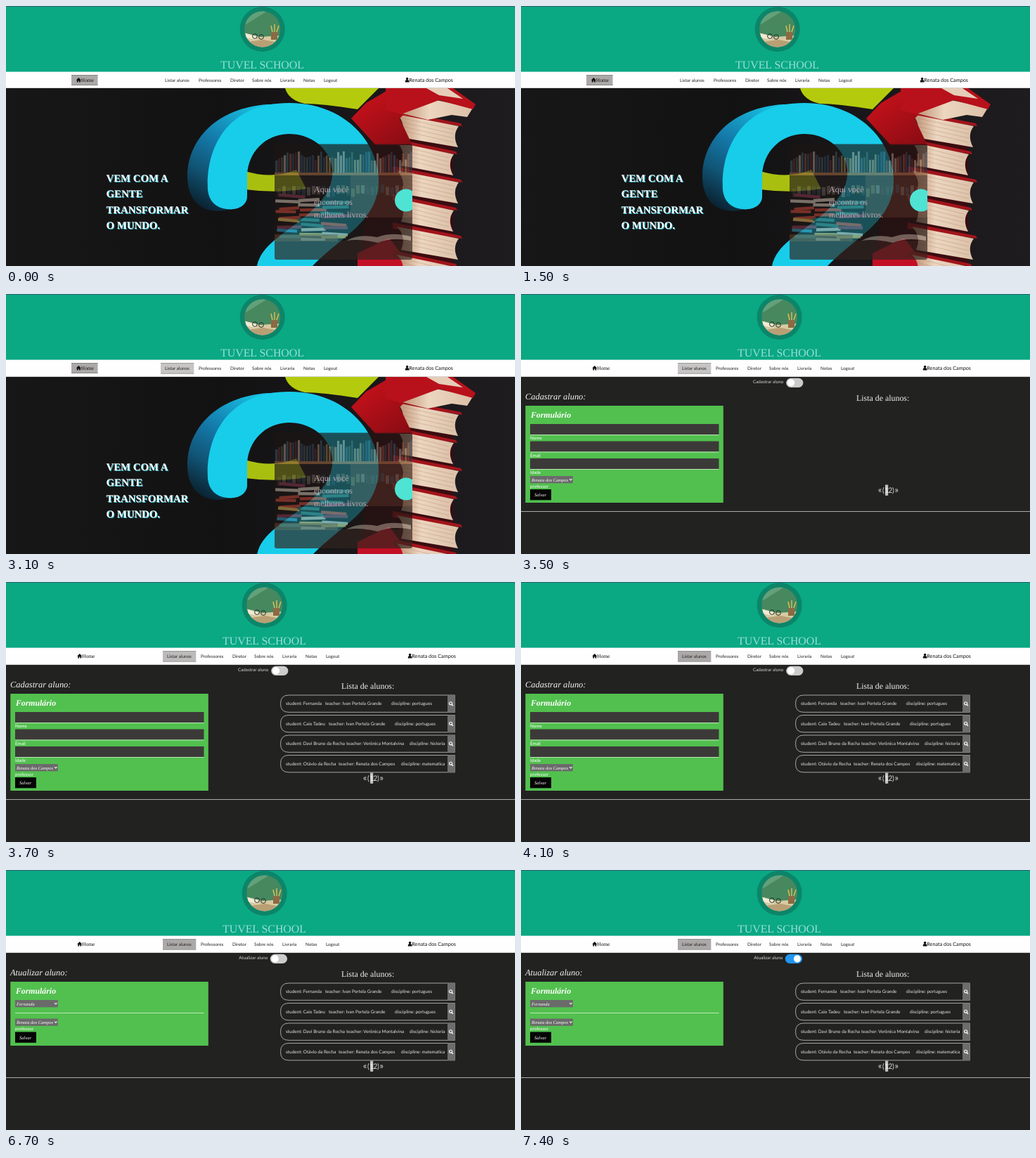
An HTML page for the animation above (8 s loop, 724 by 370 pixels).

```html
<!DOCTYPE html>
<html lang="pt">
<head>
<meta charset="utf-8">
<style>
html, body { margin: 0; width: 100%; height: 100%; overflow: hidden; background: #222221 }
svg { display: block; width: 724px; height: 370px }
text { font-family: Lato, "Open Sans", sans-serif; text-rendering: geometricPrecision; white-space: pre }
.serif { font-family: "Liberation Serif", "Noto Serif", serif }
.script { font-family: "Liberation Serif", "Noto Serif", serif; font-style: italic }
.bold { font-weight: bold }
.slogan { text-shadow: 1px 1px 0 #35c8dc }
</style>
</head>
<body>
<svg id="stage" viewBox="0 0 724 370"></svg>
<script>
const LOOP = 8000, HOVER = 2500, PAGE = 3500, LIST = 3700, TOGGLE = 6700;
const USER = "Renata dos Campos";

let seed = 7;
const rnd = () => (seed = seed * 16807 % 2147483647) / 2147483647;
const pick = list => list[Math.floor(rnd() * list.length)];
const rect = (x, y, w, h, fill, more = "") =>
  `<rect x="${x}" y="${y}" width="${w}" height="${h}" fill="${fill}" ${more}/>`;
const path = (d, fill, more = "") => `<path d="${d}" fill="${fill}" ${more}/>`;
const circle = (x, y, r, fill, more = "") => `<circle cx="${x}" cy="${y}" r="${r}" fill="${fill}" ${more}/>`;
const text = (x, y, s, size, fill = "#222", cls = "") =>
  `<text x="${x}" y="${y}" font-size="${size}" fill="${fill}" class="${cls}">${s}</text>`;
const group = (id, body, more = "") => `<g id="${id}" ${more}>${body}</g>`;

const defs = `<defs>
  <linearGradient id="wall"><stop offset="0" stop-color="#181718"/><stop offset=".42" stop-color="#131213"/>
    <stop offset="1" stop-color="#1f1c20"/></linearGradient>
  <linearGradient id="side" x1=".8" y1="0" x2=".2" y2="1"><stop offset=".1" stop-color="#18c0e2"/>
    <stop offset=".5" stop-color="#1478a8"/><stop offset=".75" stop-color="#115576"/><stop offset="1" stop-color="#0a2433"/></linearGradient>
  <linearGradient id="paper"><stop offset="0" stop-color="#b98a6c"/><stop offset=".4" stop-color="#ecd6c0"/>
    <stop offset="1" stop-color="#dcc0a8"/></linearGradient>
  <linearGradient id="red" x2="1" y2="1"><stop offset="0" stop-color="#d3121c"/><stop offset="1" stop-color="#7d0b12"/></linearGradient>
  <clipPath id="badge"><circle cx="364.7" cy="33" r="25.5"/></clipPath>
  <clipPath id="card"><rect x="382" y="196.5" width="196" height="164.5" rx="3"/></clipPath>
</defs>`;

function header() {
  const badge = circle(364.7, 33, 32, "#0c8569") +
    `<g clip-path="url(#badge)">` + rect(338, 7, 54, 38, "#47885f") +
    path("M338 7H372L338 28Z", "#63a07a") + path("M338 38L362 44L392 42V60H338Z", "#d9c9a2") +
    path("M341 39L356 43V48L341 45Z", "#f1ead2") + path("M338 52L366 48L392 53V60H338Z", "#b99f74") +
    rect(377, 37, 9, 11, "#8c6a43") +
    path("M379 37L377 28M382 37V26M385 37L388 28", "none", 'stroke="#e2c058" stroke-width="1.4"') +
    `<g stroke="#26332c">${circle(354, 43, 3.4, "none")}${circle(363, 44, 3.4, "none")}</g></g>`;
  return rect(0, 0, 724, 94, "#0aa883") + rect(0, 0, 724, 1, "#2f5f74") +
    group("brand", badge + text(305, 88.5, "TUVEL SCHOOL", 15.9, "#97dfdd", "serif"));
}

function nav() {
  const items = [[226, "Listar alunos"], [274, "Professores"], [319, "Diretor"], [350, "Sobre nós"],
    [390, "Livraria"], [423, "Notas"], [452, "Logout"]];
  return `<rect id="bar" y="93.6" width="724" fill="#fefefe"/>` +
    group("homeBox", rect(93, 98, 37.5, 15, "#aca8a8") + rect(93, 98, 37.5, .7, "#777") + rect(93, 112.3, 37.5, .7, "#777")) +
    group("home", path("M99.8 105.5L103.3 102L106.8 105.5H105.8V108.6H104V106.4H102.6V108.6H100.8V105.5Z", "#111") +
      text(106.8, 108.2, "Home", 7.4, "#111", "serif")) +
    group("menu", group("hover", `<rect id="hoverFill" x="220" y="98" width="47.3" height="15.5"/>` +
      rect(220, 98, 47.3, .7, "#888") + rect(220, 112.8, 47.3, .7, "#888")) +
      items.map(([x, s]) => text(x, 107.6, s, 6.35)).join("")) +
    group("user", circle(570.6, 103.5, 1.7, "#111") + path("M567.8 108.4V107Q567.8 105 570.6 105T573.4 107V108.4Z", "#111") +
      text(573.3, 107.9, USER, 7.25, "#111"));
}

function books() {
  let s = path("M520 190L600 165L636 200V370H505Z", "#3a0c10") + path("M500 352L545 330L575 370H500Z", "#c30f25");
  for (let i = 0; i < 6; i++) {
    const y = 154 + i * 40, r = 647 - i % 2 * 7;
    s += path(`M550 ${y - 6}L${r} ${y + 13}L${r + 2} ${y + 17}L550 ${y + 3}Z`, "#a3141b") +
      path(`M556 ${y}L${r - 3} ${y + 17}Q${r - 13} ${y + 30} ${r - 4} ${y + 47}L562 ${y + 33}Q570 ${y + 14} 556 ${y}Z`, "url(#paper)");
    for (let k = 1; k < 5; k++)
      s += path(`M566 ${y + k * 6}L${r - 10} ${y + 16 + k * 6}`, "none", 'stroke="#a98168" stroke-width=".6" opacity=".6"');
  }
  return s + path("M491 160L512 138L548 117H600L570 150L560 160L578 198H526Z", "url(#red)") +
    path("M560 152L608 133L664 145L656 158L634 155L600 162Z", "url(#paper)") +
    path("M540 117H636L668 140L664 147L616 134L562 154L540 148Z", "#b8111b") +
    path("M598 117H628L650 132L616 127Z", "#e6cdb8");
}

function shelf() {
  const tones = ["#8b4a3a", "#a9947c", "#3f6476", "#a98a4f", "#6b2f2f", "#b5a898", "#4a5648", "#344a66"];
  let s = rect(382, 196, 196, 165, "#1d1716");
  for (let x = 383; x < 577; x += 4) {
    const h = 17 + rnd() * 14;
    s += rect(x, 237 - h, 2.5 + rnd(), h, pick(tones), 'opacity=".65"');
  }
  s += rect(382, 237, 196, 4, "#8a5c3c") + rect(382, 241, 196, 24, "#251d1d") + rect(490, 241, 88, 60, "#5a3b2b", 'opacity=".6"');
  for (let x = 386; x < 575; x += 7) s += rect(x, 254 + rnd() * 6, 5, 12, pick(tones), 'opacity=".35"');
  for (let col = 0; col < 3; col++)
    for (let y = 270 + col * 4; y < 333; y += 7)
      s += rect(383 + col * 32 + rnd() * 6, y, 28 + rnd() * 10, 4.4,
        pick(["#a53e30", "#317c98", "#b4934a", "#a89c90", "#743245", "#35605a"]), `transform="rotate(${rnd() * 10 - 5} 430 ${y})"`);
  s += rect(382, 334, 196, 27, "#33241f") + rect(382, 325, 90, 10, "#7d4a2b", 'opacity=".6"') +
    path("M484 334Q502 324 528 329Q548 321 576 328V334Q548 329 529 337Q506 331 484 334Z", "#8f857a");
  return `<g clip-path="url(#card)"><g opacity=".68">${s}</g>` + circle(569, 276.5, 16, "#4fe3d4") + `</g>`;
}

function hero() {
  const words = ["VEM COM A", "GENTE", "TRANSFORMAR", "O MUNDO."];
  const lines = ["Aqui você", "encontra os", "melhores livros."];
  return rect(0, 117, 724, 253, "url(#wall)") +
    path("M397 117H530L500 147Q450 139 425 139Q402 134 397 117Z", "#b4cb0d") + books() +
    path("M340 235Q380 247 413 233L427 260Q385 267 340 261Z", "#a9bf10") +
    path("M258 243C258 190 300 145 372 140L420 139L330 200L318 289C283 299 258 280 258 243Z", "url(#side)") +
    path("M287 262C284 205 312 138 403 138C475 138 526 185 530 245C532 305 480 325 436 370H357" +
      "C363 340 395 325 425 300C455 275 466 255 464 232C460 200 432 182 402 182C368 183 345 208 343 240V272" +
      "C342 285 328 291 314 289C298 287 289 278 287 262Z", "#18cdea") +
    shelf() +
    words.map((s, i) => text(142.5, 250 + i * 22.4, s, 14.8, "#fff", "serif bold slogan")).join("") +
    lines.map((s, i) => text(438, 265 + i * 17.8, s, 12, "#b9a5ac", "serif")).join("");
}

const field = (y, label) => rect(13, y, 268.5, 15, "#3c3a39") + rect(13, y + 15, 268.5, .9, "#c9efc5") +
  text(13, y + 22, label, 6.3, "#fff");
const select = (y, s) => rect(13, y, 60.8, 10.3, "#6b6a6a") + text(15, y + 7.5, s, 6.5, "#fff", "script") +
  path(`M69 ${y + 4}l1.8 2l1.8 -2`, "none", 'stroke="#fff" stroke-width="1.1"');

// The form for a new or an existing student, with everything that depends on its height.
function form(id, verb, bottom, line, y, fields) {
  return group(id, text(6, 150, verb + " aluno:", 12.4, "#f4f4f4", "script") +
    rect(6.3, 159, 281.5, bottom - 159, "#52c04f") + text(14, 176, "Formulário", 11.8, "#fff", "script bold") +
    fields + select(y, USER) + text(13, y + 16.7, "professor", 6.3, "#fff") +
    rect(13, y + 19, 30, 15.3, "#050505") + text(19, y + 29, "Salvar", 6.6, "#fff", "script") +
    rect(0, line, 724, 1, "#aaa"));
}

function list() {
  const teacher = "Ivan Portela Grande";
  const rows = [["Fernanda", 454, teacher, 548, "portugues"], ["Caio Tadeu", 459, teacher, 553, "portugues"],
    ["Davi Bruno da Rocha", 484, "Verônica Montalvina", 574, "historia"], ["Otávio da Rocha", 473, USER, 562, "matematica"]];
  return group("list", rows.map(([name, x1, who, x2, topic], i) => {
    const y = 161 + i * 28.5, b = y + 14.3;
    return path(`M638.5 ${y}H402Q390.5 ${y} 390.5 ${y + 12.2}T402 ${y + 24.3}H638.5Z`, "none", 'stroke="#b4b4b4" stroke-width=".9"') +
      rect(628, y, 10.7, 24.3, "#6d6d6d") +
      circle(632.6, y + 11.8, 2, "none", 'stroke="#fff" stroke-width="1.1"') +
      path(`M634 ${y + 13.3}l2 2`, "none", 'stroke="#fff" stroke-width="1.3"') +
      text(398, b, "student: " + name, 6.45, "#e6e6e6") + text(x1, b, "teacher: " + who, 6.45, "#e6e6e6") +
      text(x2, b, "discipline: " + topic, 6.45, "#e6e6e6");
  }).join(""));
}

function students() {
  const pager = rect(518, 271.5, 4.2, 15.3, "#c2c2c2") +
    [[507.8, "«", 13], [514, "(", 10.5], [517.3, "1", 10.5], [522.2, "2", 10.5], [528, ")", 10.5], [531.6, "»", 13]]
      .map(([x, s, size]) => text(x, 283, s, size, s == "1" ? "#f4f4f4" : "#d8d8d8")).join("");
  return rect(0, 117.5, 724, 253, "#222221") + `<text id="mode" y="127.3" font-size="6.3" fill="#d6d6d6"></text>` +
    group("switch", `<rect id="pill" x="377.2" y="119.7" width="24.2" height="13.2" rx="6.6"/>` +
      `<circle id="knob" cy="126.3" r="5.1" fill="#fff"/>`) +
    text(477, 152, "Lista de alunos:", 11.9, "#f0f0f0", "serif") +
    form("create", "Cadastrar", 297, 309, 259, field(185, "Nome") + field(209.5, "Email") + field(234, "Idade")) +
    form("update", "Atualizar", 250, 295, 211.5, select(185, "Fernanda") + rect(13, 203, 268.5, .9, "#c9efc5")) +
    list() + pager;
}

const stage = document.getElementById("stage");
stage.innerHTML = defs + group("hero", hero()) + group("students", students()) + header() + nav();
const $ = id => document.getElementById(id);
const show = (id, on) => $(id).setAttribute("display", on ? "inline" : "none");
const move = (id, x, y = 0) => $(id).setAttribute("transform", `translate(${x} ${y})`);
const mix = (a, b, k) => `rgb(${a.map((v, i) => Math.round(v + (b[i] - v) * k))})`;
const ramp = (t, start, length) => {
  const k = Math.min(1, Math.max(0, (t - start) / length));
  return k * k * (3 - 2 * k);
};

function draw(t) {
  const inside = t >= PAGE, hovered = t >= HOVER, editing = t >= TOGGLE;
  show("hero", !inside);
  show("students", inside);
  show("homeBox", !inside);
  show("hover", hovered);
  show("list", t >= LIST);
  show("create", !editing);
  show("update", editing);
  move("hero", 0, hovered ? 1 : 0);
  move("brand", inside ? 3 : 0);
  move("menu", inside ? 3 : 0);
  move("home", inside ? 1.5 : 0);
  move("user", inside ? 4 : 0);
  $("bar").setAttribute("height", hovered ? 24.2 : 23.2);
  $("hover").setAttribute("opacity", ramp(t, HOVER - 100, 400));
  $("hoverFill").setAttribute("fill", mix([199, 196, 196], [172, 168, 168], ramp(t, PAGE, 500)));
  const k = ramp(t, TOGGLE, 400);
  $("mode").textContent = (editing ? "Atualizar" : "Cadastrar") + " aluno";
  $("mode").setAttribute("x", editing ? 331.3 : 330);
  move("switch", editing ? -1.4 : 0);
  $("pill").setAttribute("fill", mix([204, 204, 204], [33, 150, 243], k));
  $("knob").setAttribute("cx", 384.1 + 10.2 * k);
}

let start;
function tick(now) {
  start ??= now;
  draw((now - start) % LOOP);
  requestAnimationFrame(tick);
}
draw(0);
requestAnimationFrame(tick);
</script>
</body>
</html>
```
